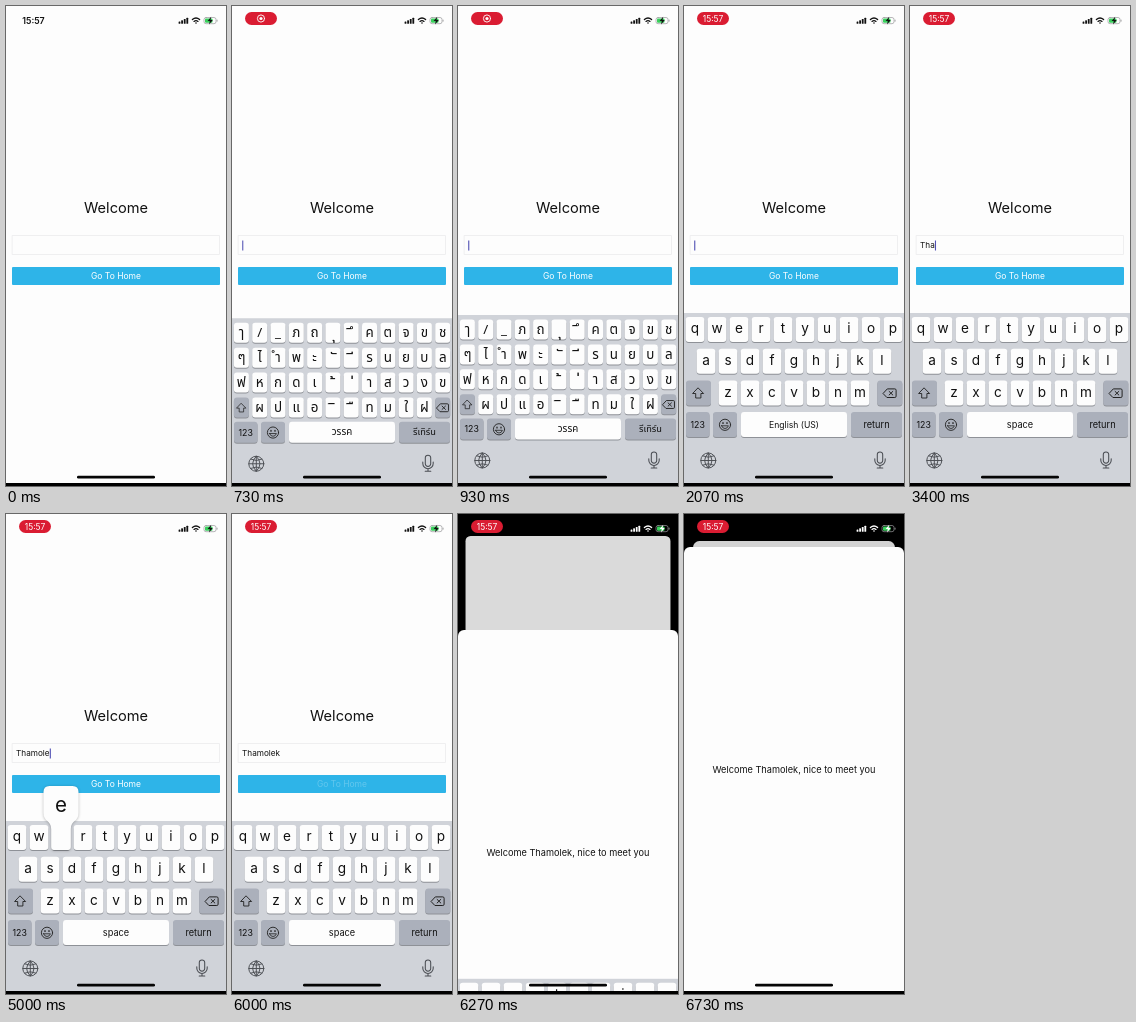
An HTML page with a canvas for the animation above (6990 ms loop, 220 by 480 pixels).

```html
<!DOCTYPE html>
<html lang="en">
<head>
<meta charset="utf-8">
<title>Welcome form</title>
<style>
html, body { margin: 0; width: 100%; height: 100%; overflow: hidden; background: #000; }
canvas { display: block; width: 220px; height: 480px; }
</style>
</head>
<body>
<canvas id="stage" width="220" height="480"></canvas>
<script>
const LOOP = 6990;
const W = 220, H = 480, FLOOR = 477;
const NAME = 'Thamolek';
const PRESSES = [2860, 3050, 3240, 3760, 4180, 4560, 4930, 5370];
const HOLD = 130;
const SHIFT_ON = 2670, SWITCH = 1870, MODAL = 6060;
const FONT = 'Inter, "Noto Sans", sans-serif';
const THAI_FONT = '"Noto Sans Thai", "Noto Sans", "Noto Sans CJK", Inter, sans-serif';
const LATIN = ['qwertyuiop', 'asdfghjkl', 'zxcvbnm'];
const THAI = ['ๅ / _ ภ ถ ุ ึ ค ต จ ข ช', 'ๆ ไ ำ พ ะ ั ี ร น ย บ ล',
  'ฟ ห ก ด เ ้ ่ า ส ว ง ข', 'ผ ป แ อ ิ ื ท ม ใ ฝ'].map(r => r.split(' '));
const MARK = /[\u0e31\u0e34-\u0e3a\u0e47-\u0e4e]/;
const g = document.getElementById('stage').getContext('2d');

const clamp = v => Math.max(0, Math.min(1, v));
const span = (t, from, ms) => clamp((t - from) / ms);
const easeOut = p => 1 - Math.pow(1 - p, 3.4);

function box(x, y, w, h, r, fill) {
  g.beginPath();
  g.roundRect(x, y, w, h, r);
  g.fillStyle = fill;
  g.fill();
}

function text(s, x, y, size, { color = '#111', align = 'center', weight = 400, font = FONT } = {}) {
  g.font = `${weight} ${size}px ${font}`;
  g.textAlign = align;
  g.fillStyle = color;
  g.fillText(s, x, y);
}

function line(d, width = 1, color = '#222') {
  g.strokeStyle = color;
  g.lineWidth = width;
  g.lineCap = g.lineJoin = 'round';
  g.stroke(new Path2D(d));
}

function at(x, y, draw, k = 1) {
  g.save();
  g.translate(x, y);
  g.scale(k, k);
  draw();
  g.restore();
}

function key(x, y, w, h, dark) {
  box(x, y + 1, w, h, 3, '#8e9197');
  box(x, y, w, h, 3, dark ? '#abb0bb' : '#fdfdfd');
}

function shiftIcon(x, y, k, on) {
  const d = 'M0-5.2L5.3.2H2.6V4.7H-2.6V.2H-5.3Z';
  at(x, y, () => {
    if (on) { g.fillStyle = '#111'; g.fill(new Path2D(d)); }
    line(d, 0.9);
  }, k);
}

function deleteIcon(x, y, k) {
  at(x, y, () => {
    line('M-6.5 0L-2.5-4.3H5Q6.3-4.3 6.3-3V3Q6.3 4.3 5 4.3H-2.5Z', 1);
    line('M-.7-1.8L3 1.8M3-1.8L-.7 1.8', 1);
  }, k);
}

function smiley(x, y) {
  at(x, y, () => {
    line('M5.6 0A5.6 5.6 0 1 1-5.6 0A5.6 5.6 0 1 1 5.6 0', 0.9);
    line('M-2-2.1V-1.4M2-2.1V-1.4', 1.3);
    line('M-3.4 1H3.4Q2.6 3.7 0 3.7T-3.4 1Z', 0.8);
  });
}

function globe(x, y) {
  at(x, y, () => {
    line('M7.5 0A7.5 7.5 0 1 1-7.5 0A7.5 7.5 0 1 1 7.5 0M0-7.5V7.5M-7.5 0H7.5' +
      'M0-7.5Q-7.4 0 0 7.5Q7.4 0 0-7.5M-5.6-4.6Q0-1.8 5.6-4.6M-5.6 4.6Q0 1.8 5.6 4.6', 0.95, '#4a4d53');
  });
}

function mic(x, y) {
  at(x, y, () => {
    line('M-2.7-5.4A2.7 2.7 0 0 1 2.7-5.4V.4A2.7 2.7 0 0 1-2.7.4Z' +
      'M-5.2-1.3V.3A5.2 5.2 0 0 0 5.2 .3V-1.3M0 5.5V8M-2.8 8H2.8', 1.05, '#4a4d53');
  });
}

function popup(ch, x, y) {
  const l = x - 9.8, r = x + 9.8, t = y - 39, b = y + 25;
  const left = Math.max(1, x - 17.5), right = Math.min(W - 1, x + 17.5);
  g.save();
  g.shadowColor = 'rgba(0,0,0,.28)';
  g.shadowBlur = 3;
  g.shadowOffsetY = 0.6;
  g.fillStyle = '#fdfdfd';
  g.fill(new Path2D(`M${left + 6} ${t}H${right - 6}Q${right} ${t} ${right} ${t + 6}V${t + 27}` +
    `C${right} ${t + 36} ${r} ${t + 34} ${r} ${t + 43}V${b - 3}Q${r} ${b} ${r - 3} ${b}` +
    `H${l + 3}Q${l} ${b} ${l} ${b - 3}V${t + 43}` +
    `C${l} ${t + 34} ${left} ${t + 36} ${left} ${t + 27}V${t + 6}Q${left} ${t} ${left + 6} ${t}Z`));
  g.restore();
  text(ch, (left + right) / 2, y - 13, 20.5);
}

function bottomRow(y, h, space, ret, font) {
  key(2, y, 23.5, h, true);
  text('123', 13.7, y + h / 2 + 3.4, 8.8);
  key(29, y, 24, h, true);
  smiley(41, y + h / 2 + 0.3);
  key(57, y, 106, h);
  space(y + h / 2 + 3);
  key(167, y, 51, h, true);
  text(ret, 192.5, y + h / 2 + 3, 9.2, { font });
}

function thaiKeys() {
  const opt = { font: THAI_FONT };
  THAI.forEach((row, r) => {
    const y = 313.5 + r * 24.9, first = r === 3 ? 1 : 0;
    row.forEach((ch, i) => {
      const x = 9.4 + (i + first) * 18.3;
      key(x - 7.5, y, 15, 20);
      if (MARK.test(ch)) text('\u00a0' + ch, x + 1, y + 16.5, 16, opt);
      else text(ch, x, y + 14.5, 13.4, opt);
    });
  });
  const y = 313.5 + 3 * 24.9;
  key(1.9, y, 15, 20, true);
  shiftIcon(9.4, y + 10.5, 0.85);
  key(203.2, y, 15, 20, true);
  deleteIcon(210.7, y + 10.3, 0.92);
  bottomRow(412.5, 21, b => text('วรรค', 110, b, 9.8, opt), 'รีเทิร์น', THAI_FONT);
}

function latinKeys(t) {
  const upper = t >= SHIFT_ON && t < PRESSES[0] + HOLD;
  const hit = PRESSES.findIndex(p => t >= p && t < p + HOLD);
  const active = hit < 0 ? '' : NAME[hit].toLowerCase();
  let bubble = null;
  LATIN.forEach((row, r) => {
    const y = 311 + r * 31.8, x0 = [11, 22, 44][r];
    [...row].forEach((ch, i) => {
      const x = x0 + i * 22, label = upper ? ch.toUpperCase() : ch;
      key(x - 9.3, y, 18.6, 25);
      text(label, x, y + 16.3, upper ? 12.6 : 13.6);
      if (ch === active) bubble = [label, x, y];
    });
  });
  key(2, 374.6, 25, 25, !upper);
  shiftIcon(14.3, 387.3, 1, upper);
  key(193.3, 374.6, 25, 25, true);
  deleteIcon(205.8, 387.2, 1);
  const fade = span(t, 2560, 200);
  bottomRow(406, 25, b => {
    text('English (US)', 110, b, 8.6, { color: `rgba(17,17,17,${1 - fade})` });
    text('space', 110, b, 9.2, { color: `rgba(17,17,17,${fade})` });
  }, 'return', FONT);
  if (bubble) popup(...bubble);
}

function keyboard(t) {
  const up = easeOut(span(t, 400, 480)), down = easeOut(span(t, MODAL, 420));
  const dy = 174 * (1 - up + down);
  if (dy >= 173.9) return;
  const thai = t < SWITCH, top = thai ? 309 : 307;
  at(0, dy, () => {
    g.fillStyle = '#d0d3d9';
    g.fillRect(0, top, W, H - top);
    if (thai) thaiKeys(); else latinKeys(t);
    globe(24.3, 454.5);
    mic(196, 454);
  });
}

function form(t) {
  g.fillStyle = '#fdfdfd';
  g.fillRect(0, 0, W, H);
  text('Welcome', 110, 207.4, 14.6);
  g.strokeStyle = '#efeff0';
  g.lineWidth = 1;
  g.strokeRect(6.5, 229.5, 207, 19);

  const typed = NAME.slice(0, PRESSES.filter(p => t >= p).length);
  text(typed, 10, 242.2, 8.2, { align: 'left' });
  if (t > 430 && t < 5800) {
    const width = g.measureText(typed).width;
    const typing = t > PRESSES[0] && t < 5600;
    const glow = typing ? 1 : clamp(0.5 + 1.4 * Math.cos((t - 930) / 1000 * 2 * Math.PI));
    g.fillStyle = `rgba(80,80,180,${glow})`;
    g.fillRect(10.2 + width, 234.5, 1.1, 10);
  }

  const press = span(t, 5800, 130) * (1 - span(t, 6150, 200));
  box(6, 261, 208, 18, 1, '#2eb4e8');
  text('Go To Home', 110, 273, 8.5, { color: `rgba(255,255,255,${1 - 0.75 * press})` });
}

function statusBar(t) {
  const ink = t > MODAL + 180 ? '#fff' : '#111';
  if (t < 470) {
    text('15:57', 27.5, 18, 8.8, { weight: 600, color: ink });
  } else {
    box(13, 6, 32, 13, 6.5, '#da1c32');
    if (t < 1500) {
      line('M32.6 12.5A3.6 3.6 0 1 1 25.4 12.5A3.6 3.6 0 1 1 32.6 12.5', 0.9, '#fff');
      box(27.4, 10.9, 3.2, 3.2, 1.6, '#fff');
    } else {
      text('15:57', 29, 15.7, 8.4, { color: '#fff' });
    }
  }
  for (let i = 0; i < 4; i++) {
    const h = 2.2 + i * 1.3;
    box(172.6 + i * 2.6, 17.8 - h, 1.8, h, 0.5, ink);
  }
  line('M186.4 13.6Q190 10.4 193.6 13.6M188 15.4Q190 13.7 192 15.4', 1.3, ink);
  box(189.2, 16.2, 1.6, 1.6, 0.8, ink);
  g.beginPath();
  g.roundRect(198, 11.5, 12, 6.2, 2);
  g.lineWidth = 0.7;
  g.strokeStyle = '#9a9a9c';
  g.stroke();
  box(210.6, 13.5, 0.9, 2.2, 0.4, '#9a9a9c');
  box(199, 12.5, 7.5, 4.2, 1, '#39cf5c');
  g.fillStyle = ink;
  g.fill(new Path2D('M205.2 10.8L201.6 15.1H203.8L203 18.4L206.8 14H204.5Z'));
}

function draw(t) {
  g.fillStyle = '#000';
  g.fillRect(0, 0, W, H);
  g.save();
  g.beginPath();
  g.rect(0, 0, W, FLOOR);
  g.clip();

  const rise = easeOut(span(t, MODAL, 540));
  const k = 1 - 0.082 * rise;
  g.save();
  g.translate(W / 2 * (1 - k), 27 * rise);
  g.scale(k, k);
  g.beginPath();
  g.roundRect(0, 0, W, H, 7 * rise);
  g.clip();
  form(t);
  g.fillStyle = `rgba(0,0,0,${0.17 * rise})`;
  g.fillRect(0, 0, W, H);
  g.restore();

  if (rise > 0) {
    at(0, (1 - rise) * (H - 33), () => {
      box(0, 33, W, H, [6, 6, 0, 0], '#fdfdfd');
      text(`Welcome ${NAME}, nice to meet you`, 110, 258.6, 9.2);
    });
  }
  keyboard(t);
  g.restore();
  statusBar(t);
  box(71, 469.7, 78, 2.9, 1.4, '#050505');
}

const start = performance.now();
function tick() {
  draw((performance.now() - start) % LOOP);
  requestAnimationFrame(tick);
}
draw(0);
requestAnimationFrame(tick);
</script>
</body>
</html>
```
